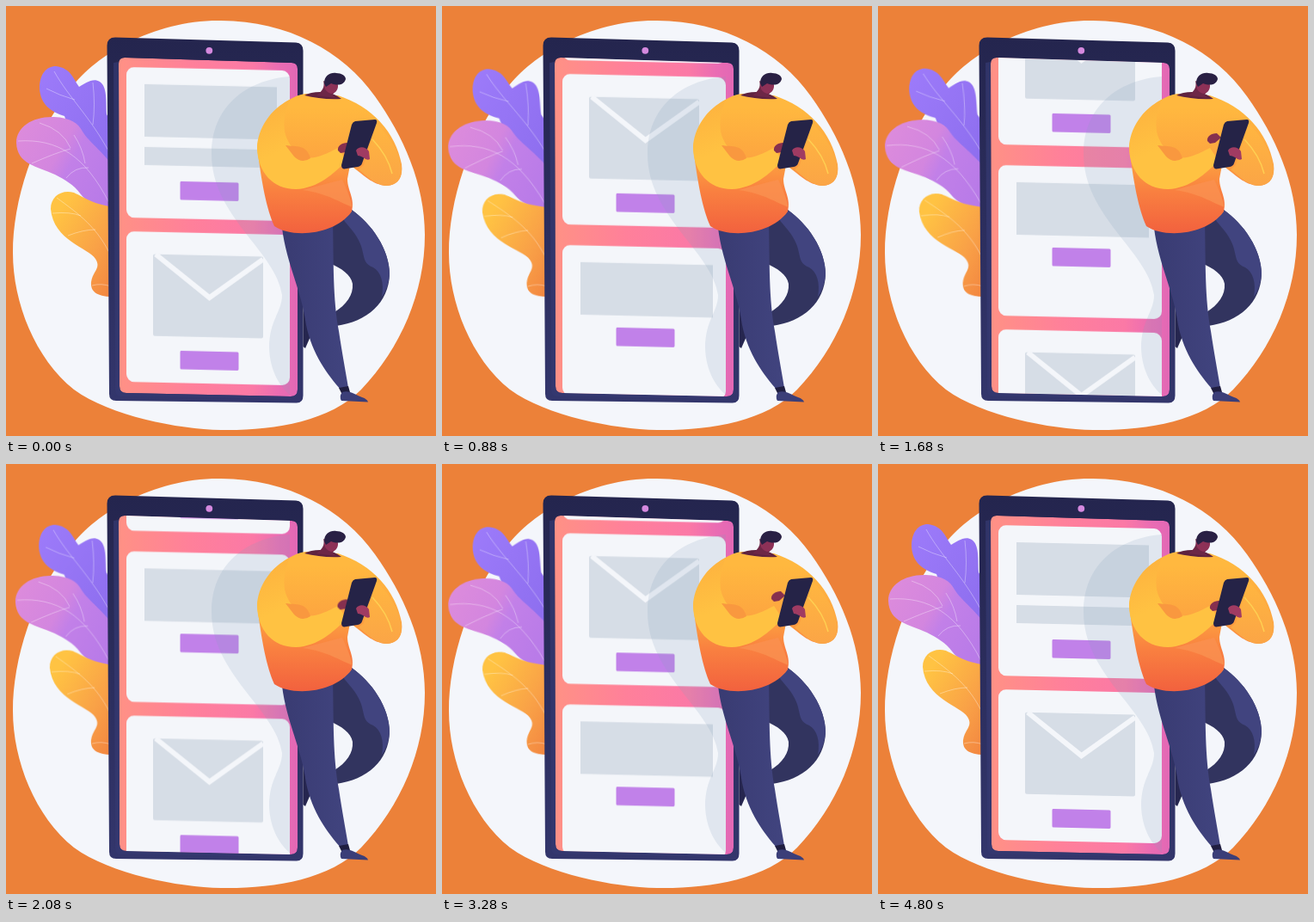
Recreate the animation shown at these times as an HTML page without scripts. Size 500 by 500 pixels, loop 4840 ms.

```html
<!DOCTYPE html>
<html lang="en">
<head>
<meta charset="utf-8">
<title>Mobile mail</title>
<style>
html, body { margin: 0; width: 100%; height: 100%; overflow: hidden; background: #ec8139; }
svg { display: block; width: 100vw; height: 100vh; }

.leaf { animation: sway 1210ms cubic-bezier(.37, 0, .63, 1) infinite alternate; }
.violet { transform-origin: 118px 160px; --turn: -3.6deg; }
.pink { transform-origin: 120px 240px; --turn: -4.2deg; }
.yellow { transform-origin: 118px 330px; --turn: -3.8deg; }
.vein { fill: none; stroke: #fff; stroke-width: .7; opacity: .5; }
@keyframes sway { to { transform: rotate(var(--turn)); } }

/* two swipes down the list, then one back to the top */
.list { animation: scroll 4840ms linear infinite; }
@keyframes scroll {
  0% { transform: none; animation-timing-function: cubic-bezier(.33, .25, .67, .9); }
  19.83%, 26.2% { transform: translateY(-190px); }
  26.2% { animation-timing-function: cubic-bezier(.33, .25, .67, .9); }
  46%, 54.55% { transform: translateY(-390px); }
  54.55% { animation-timing-function: cubic-bezier(.4, 0, .6, 1); }
  79.34%, 100% { transform: none; }
}

.thumb { animation: swipe 4840ms ease-in-out infinite; }
@keyframes swipe {
  0%, 18%, 27%, 46%, 58%, 93%, 100% { transform: none; }
  8.26%, 34.7%, 68%, 82% { transform: translate(-3px, -11px); }
}
</style>
</head>
<body>
<svg viewBox="0 0 500 500">
  <defs>
    <linearGradient id="violetFill" x2="1" y2="1"><stop stop-color="#9d7bfa"/><stop offset="1" stop-color="#8a6bec"/></linearGradient>
    <linearGradient id="pinkFill" x2="1" y2=".5"><stop stop-color="#de8cdb"/><stop offset=".48" stop-color="#d386df"/><stop offset=".62" stop-color="#c280e8"/><stop offset="1" stop-color="#b97be8"/></linearGradient>
    <linearGradient id="yellowFill" x2="1" y2="1"><stop offset=".15" stop-color="#ffc343"/><stop offset=".6" stop-color="#f9a147"/><stop offset="1" stop-color="#f1803f"/></linearGradient>
    <linearGradient id="caseFill" x2="0" y2="1"><stop stop-color="#24254e"/><stop offset="1" stop-color="#33366c"/></linearGradient>
    <linearGradient id="screenFill"><stop stop-color="#ff9185"/><stop offset=".4" stop-color="#ff809a"/><stop offset=".75" stop-color="#fb79a6"/><stop offset=".9" stop-color="#ea6cb3"/><stop offset="1" stop-color="#e268b5"/></linearGradient>
    <linearGradient id="sweaterFill" x2="0" y2="1"><stop offset=".1" stop-color="#ffb83f"/><stop offset=".45" stop-color="#fda640"/><stop offset=".7" stop-color="#f98040"/><stop offset="1" stop-color="#f2613e"/></linearGradient>
    <linearGradient id="sleeveFill" x2=".4" y2="1"><stop stop-color="#fdb03e"/><stop offset=".6" stop-color="#ffc242"/></linearGradient>
    <linearGradient id="cuffFill" x2="0" y2="1"><stop stop-color="#ffb640"/><stop offset="1" stop-color="#fba546"/></linearGradient>
    <linearGradient id="legFill" x2="1"><stop stop-color="#393b72"/><stop offset="1" stop-color="#41447f"/></linearGradient>
    <path id="screen" d="M138 60 L332 66 Q339 66 339 73 V446 Q339 454 331 454 L140 450 Q132 450 132 442 L131 67 Q131 60 138 60Z"/>
    <clipPath id="screenClip"><use href="#screen"/></clipPath>

    <rect id="blank" width="190" height="175" rx="9" fill="#f4f6fa"/>
    <g id="article">
      <use href="#blank"/>
      <rect x="21" y="19.500" width="154" height="61" fill="#d6dde6"/>
    </g>
    <rect id="button" x="62.500" width="68" height="21.500" rx="1.500" fill="#c181e9"/>
    <g id="mail">
      <use href="#blank"/>
      <rect x="31" y="26" width="128" height="95" rx="2" fill="#d6dde6"/>
      <path d="M34 26 L96.500 75 L159 29" fill="none" stroke="#f4f6fa" stroke-width="6"/>
      <use href="#button" y="137.500"/>
    </g>
  </defs>

  <rect width="500" height="500" fill="#ec8139"/>
  <path fill="#f4f6fb" d="M247 17 C325 16 392 52 429 105 C462 151 487 207 487 266 C487 333 459 398 413 446 C376 484 308 494 250 493 C200 492 122 477 79 446 C34 410 8 345 8 287 C8 227 31 152 76 95 C104 58 170 17 247 17Z"/>

  <g class="leaf violet">
    <path fill="url(#violetFill)" d="M132 215 C104 200 82 172 68 128 C52 123 40 114 39 96 C39 79 47 70 58 70 C75 72 78 84 85 94 C92 90 101 83 109 88 C118 94 116 110 117 126 L132 150Z"/>
    <path class="vein" d="M56 76 C74 108 96 126 120 170 M47 96 Q62 104 80 109 M101 89 Q104 115 101 138"/>
  </g>
  <g class="leaf pink">
    <path fill="url(#pinkFill)" d="M12 159 C12 140 32 128 56 129 C75 130 84 136 89 146 C98 160 109 165 132 195 V238 C106 234 96 230 87 219 C78 207 70 203 57 196 C35 186 13 184 12 159Z"/>
    <path class="vein" d="M14 157 C60 154 92 174 120 229 M39 136 Q66 144 75 165 M79 150 Q89 165 92 183 M30 183 Q57 171 75 166 M70 200 Q80 187 96 188"/>
  </g>
  <g class="leaf yellow">
    <path fill="url(#yellowFill)" d="M52 236 C52 221 65 213 79 217 C92 223 101 231 132 235 V338 C108 339 98 334 99 321 C101 308 111 305 104 294 C96 281 55 273 52 236Z"/>
    <path class="vein" d="M59 223 C85 242 107 258 122 291 M54 241 Q75 239 87 244 M72 267 Q90 260 104 260 M100 325 Q111 322 122 326"/>
  </g>

  <path fill="url(#caseFill)" d="M127 36.500 L337 42.500 Q345.500 43 345.500 52 V453 Q345.500 462 337 461.500 L128 459 Q120 459 120 451 L117.500 46 Q117.500 36.500 127 36.500Z"/>
  <path fill="#353970" opacity=".75" d="M125 66 L131 65 L132 442 Q132 450 140 450 L331 454 V457 L133 454 Q127 453 127 447Z"/>
  <circle cx="236.300" cy="51.800" r="3.900" fill="#d589df"/>

  <g clip-path="url(#screenClip)">
    <use href="#screen" fill="url(#screenFill)"/>
    <g class="list">
      <g transform="translate(140 71) skewY(1.3)">
        <use href="#article"/>
        <rect x="21" y="92.500" width="154" height="21" fill="#d6dde6"/>
        <use href="#button" y="131.500"/>
      </g>
      <g transform="translate(140 262) skewY(1.3)"><use href="#mail"/></g>
      <g transform="translate(140 461) skewY(1.3)">
        <use href="#article"/>
        <use href="#button" y="94.500"/>
      </g>
      <g transform="translate(140 652) skewY(1.3)"><use href="#mail"/></g>
    </g>
    <path fill="#84a0bd" opacity=".18" d="M330 82 C278 86 239 118 239 172 C239 245 314 285 321 336 C321 356 306 365 306 398 C307 425 319 443 330 452Z"/>
  </g>

  <!-- legs -->
  <path fill="#26264f" d="M345.500 338 L349 366 L355 382 L348 398 L345.500 396Z"/>
  <path fill="#32345f" d="M374 250 L402 237 C425 253 446 283 446 312 C445 345 420 367 384 372 L382 356 C396 347 404 336 403 323 C401 312 390 305 376 299Z"/>
  <path fill="#41447f" d="M402 237 C425 253 446 283 446 312 C445 322 442 331 437 338 C440 322 436 309 427 304 C417 300 417 295 415 287 C412 267 396 255 390 245Z"/>
  <path fill="url(#legFill)" d="M321 258 L380 247 C381 301 380 340 387 378 C391 405 395 425 398 444 L390 447 C374 429 356 405 349 371 C344 331 326 300 321 258Z"/>
  <path fill="#201e40" d="M387 444 L398 442 L400 449 L391 452Z"/>
  <path fill="#3b3e78" d="M391 449 C399 446 406 452 414 455 Q420 457 421 460.500 L390 459 Q387 454 391 449Z"/>

  <!-- torso and arms -->
  <path fill="url(#sweaterFill)" d="M348 102 C322 106 296 134 292 164 C297 205 303 236 312 256 C332 270 382 267 402 239 C406 223 397 215 397 201 L400 185 C416 196 425 208 443 209 C456 208 462 199 460 184 C453 147 426 117 386 104Z"/>
  <path fill="#fb9150" opacity=".8" d="M345 214 Q371 207 391 202 Q399 218 403 234 C387 228 374 218 345 214Z"/>
  <path fill="url(#cuffFill)" d="M416 185 L431 137 C446 151 457 170 460 187 C461 202 454 209 441 209 C427 207 420 198 410 190Z"/>
  <path d="M426 155 Q444 174 449 195" fill="none" stroke="#ffcf52" stroke-width="1.500"/>
  <path fill="url(#sleeveFill)" d="M330 109 C308 119 292 143 292 166 C293 193 310 213 337 213 C363 212 381 195 396 180 L386 165 C368 174 355 181 342 173 C323 158 318 139 330 109Z"/>
  <path fill="#f9983f" d="M325 162 C337 164 349 160 354 177 Q344 184 335 175Z"/>
  <path fill="#5f2340" d="M347 104 C357 98 379 98 390 108 C374 109 360 107 347 104Z"/>

  <!-- head -->
  <path fill="#6d2747" d="M369 87 L384 96 L380 103 L383 107 L361 104 C368 99 371 94 369 87Z"/>
  <path fill="#8d3157" d="M371 87 C379 82 387 86 386 94 C385 101 379 104 374 100 C370 97 369 92 371 87Z"/>
  <path fill="#292044" d="M370 90 C370 81 377 77 384 78 C390 78 395 81 395 85 C393 92 386 93 378 90 L372 94Z"/>

  <!-- hands and handset -->
  <path class="thumb" fill="#86304f" d="M386 168 C385 163 390 159 397 159 L402 164 L395 170 L389 171Z"/>
  <path fill="#252347" d="M406 134 L429 132 Q432 132 431 136 L414 183 Q413 186 409 187 L393 189.500 Q390 189 390 185 L402 138 Q403 135 406 134Z"/>
  <path fill="#a03b62" d="M407 168 C410 163 418 163 422 169 L423 178 C419 181 415 174 409 174Z"/>
</svg>
</body>
</html>
```
